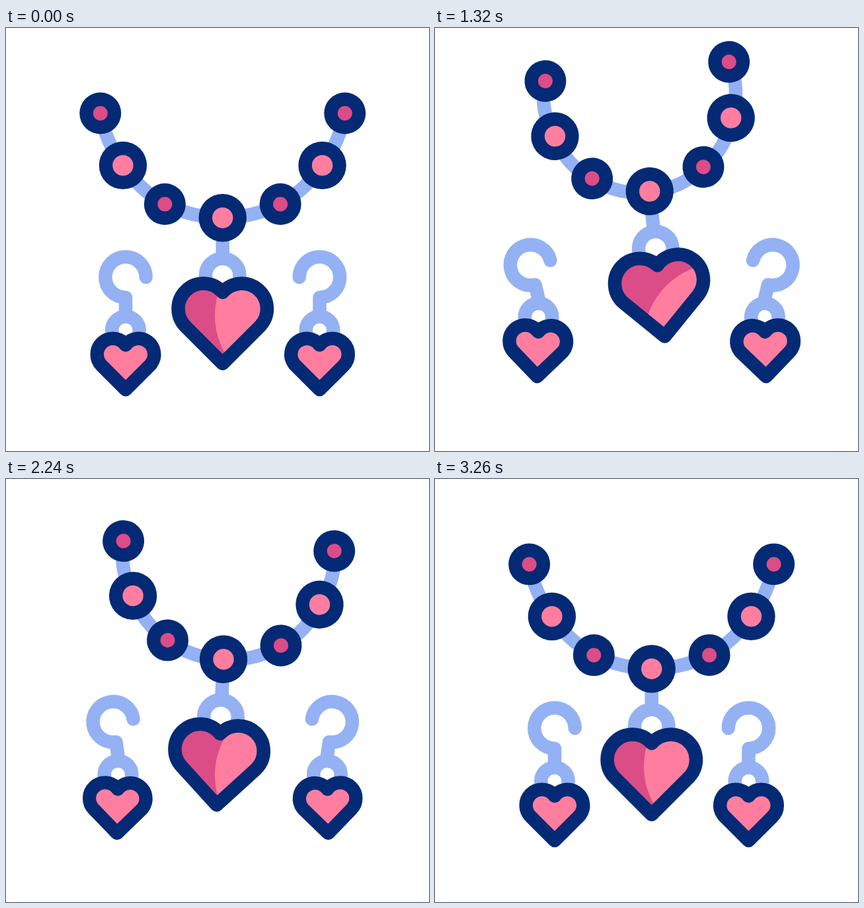
Recreate the animation shown at these times as an HTML page with a canvas. Size 640x640 px, loop 3.4 s.

```html
<!DOCTYPE html>
<html lang="en">
<head>
<meta charset="utf-8">
<title>Jewelry</title>
<style>
html, body { margin: 0; height: 100%; overflow: hidden; background: #fff; }
canvas { display: block; }
</style>
</head>
<body>
<canvas id="stage" width="640" height="640"></canvas>
<script>
const ctx = document.getElementById('stage').getContext('2d');
const LOOP = 3400, MID = 327.75, DEG = Math.PI / 180, TAU = Math.PI * 2;
const NAVY = '#042a75', BLUE = '#94b1f4', PINK = '#ff7ea0', ROSE = '#db4d86';

const ramp = (t, a, b) => Math.min(1, Math.max(0, (t - a) / (b - a)));
const ease = (t, a, b) => {
  const u = ramp(t, a, b);
  return u * u * (3 - 2 * u);
};
// Up from a to b, down again from b to c.
const pulse = (t, a, b, c) => ease(t, a, b) - ease(t, b, c);
const dip = t => pulse(t, 60, 360, 800);

// Quick rise to a share of the height, slow drift to the top, then return.
const rise = (t, start, share, hold, end) =>
  (share * ease(t, start, 800) + (1 - share) * ramp(t, 800, hold)) * (1 - ease(t, hold, end));

// Eases through evenly spaced peaks, in degrees.
function sway(t, start, step, peaks) {
  return DEG * peaks.slice(1).reduce((sum, p, i) =>
    sum + (p - peaks[i]) * ease(t, start + i * step, start + (i + 1) * step), peaks[0]);
}

function disc(x, y, r, color) {
  ctx.beginPath();
  ctx.arc(x, y, r, 0, TAU);
  ctx.fillStyle = color;
  ctx.fill();
}

function stroke(color) {
  ctx.strokeStyle = color;
  ctx.stroke();
}

function ring(x, y, r) {
  ctx.beginPath();
  ctx.arc(x, y, r, 0, TAU);
  stroke(BLUE);
}

function bead(x, y, big) {
  disc(x, y, big ? 36.2 : 31.5, NAVY);
  disc(x, y, big ? 15.7 : 11, big ? PINK : ROSE);
}

// Two lobes of radius r, each d away from the axis, and a right-angled tip.
function heart(x, y, d, r, color, sheen) {
  const a = Math.acos(d / r), path = new Path2D();
  path.arc(x - d, y, r, Math.PI * 0.75, TAU - a);
  path.arc(x + d, y, r, Math.PI + a, TAU + Math.PI / 4);
  path.lineTo(x, y + d + r * Math.SQRT2);
  path.closePath();
  ctx.fillStyle = color;
  ctx.fill(path);
  if (sheen) {
    ctx.save();
    ctx.clip(path);
    ctx.resetTransform();
    sheen();
    ctx.restore();
  }
  ctx.strokeStyle = NAVY;
  ctx.stroke(path);
}

function chain(points, bulge) {
  ctx.beginPath();
  ctx.moveTo(...points[0]);
  for (let i = 1; i < points.length; i++) {
    const [x0, y0] = points[i - 1], [x1, y1] = points[i];
    const dx = x1 - x0, dy = y1 - y0, k = 2 * bulge / Math.hypot(dx, dy);
    ctx.quadraticCurveTo((x0 + x1) / 2 - dy * k, (y0 + y1) / 2 + dx * k, x1, y1);
  }
  stroke(BLUE);
}

function necklace(t) {
  const up = rise(t, 510, 0.82, 2020, 2460), m = 1.19 * up;
  const y = 34.3 * dip(t) - 45 * up + 17.2 * pulse(t, 2020, 2480, 3250);
  ctx.save();
  ctx.translate(MID, 316 + y);
  ctx.rotate(sway(t, 740, 640, [0, -6.1, 4.5, -2.1, 0]));
  ctx.translate(-MID, -316);

  const side = [
    [185 - 42.5 * m, 129 - 22.5 * m],
    [150.8 - 15.9 * m, 207.9 - 17.2 * m],
    [87.4 - 2.6 * m, 266.5 - 7 * m]
  ];
  const points = [
    ...side.map(([x, y]) => [MID - x, y]),
    [MID, 287.2],
    ...side.map(([x, y]) => [MID + x, y]).reverse()
  ];
  chain(points, 5 + 3.5 * m);
  ctx.beginPath();
  ctx.moveTo(MID, 287);
  ctx.lineTo(MID, 346);
  stroke(BLUE);
  ring(MID, 374.5, 25.8);
  points.forEach(([x, y], i) => bead(x, y, i % 2));
  // The highlight stays upright and slides against the pendant.
  heart(MID, 424.8, 29, 38.2, ROSE, () => disc(431, 435 - 0.9 * y, 115, PINK));
  ctx.restore();
}

function earring(t) {
  const up = rise(t, 410, 0.65, 1940, 2480), tilt = -15.5 * DEG * up ** 0.75;
  ctx.save();
  ctx.translate(181 - 45 * up, 377 + 24.5 * dip(t) - 22.7 * up);
  ctx.rotate(tilt);
  ctx.beginPath();
  ctx.arc(0, 0, 30.7, 0, Math.PI / 2, true);
  ctx.lineTo(0, 55);
  stroke(BLUE);

  ctx.translate(0, 55);
  ctx.rotate(sway(t, 80, 430, [0, 10.6, -12.6, 1.8, -13.9, 1, -2.3, 0]) - tilt);
  ring(0, 25.2, 20.8);
  const s = 1 - 0.038 * pulse(t, 2050, 2560, 3250);
  ctx.translate(0, 25);
  ctx.scale(s, s);
  heart(0, 36.8, 19.3, 24, PINK);
  ctx.restore();
}

function draw(t) {
  ctx.fillStyle = '#fff';
  ctx.fillRect(0, 0, 640, 640);
  ctx.lineWidth = 20.5;
  ctx.lineCap = ctx.lineJoin = 'round';
  necklace(t);
  earring(t);
  ctx.save();
  ctx.translate(2 * MID, 0);
  ctx.scale(-1, 1);
  earring(t);
  ctx.restore();
}

let start;
function frame(now) {
  start ??= now;
  draw((now - start) % LOOP);
  requestAnimationFrame(frame);
}
draw(0);
requestAnimationFrame(frame);
</script>
</body>
</html>
```
